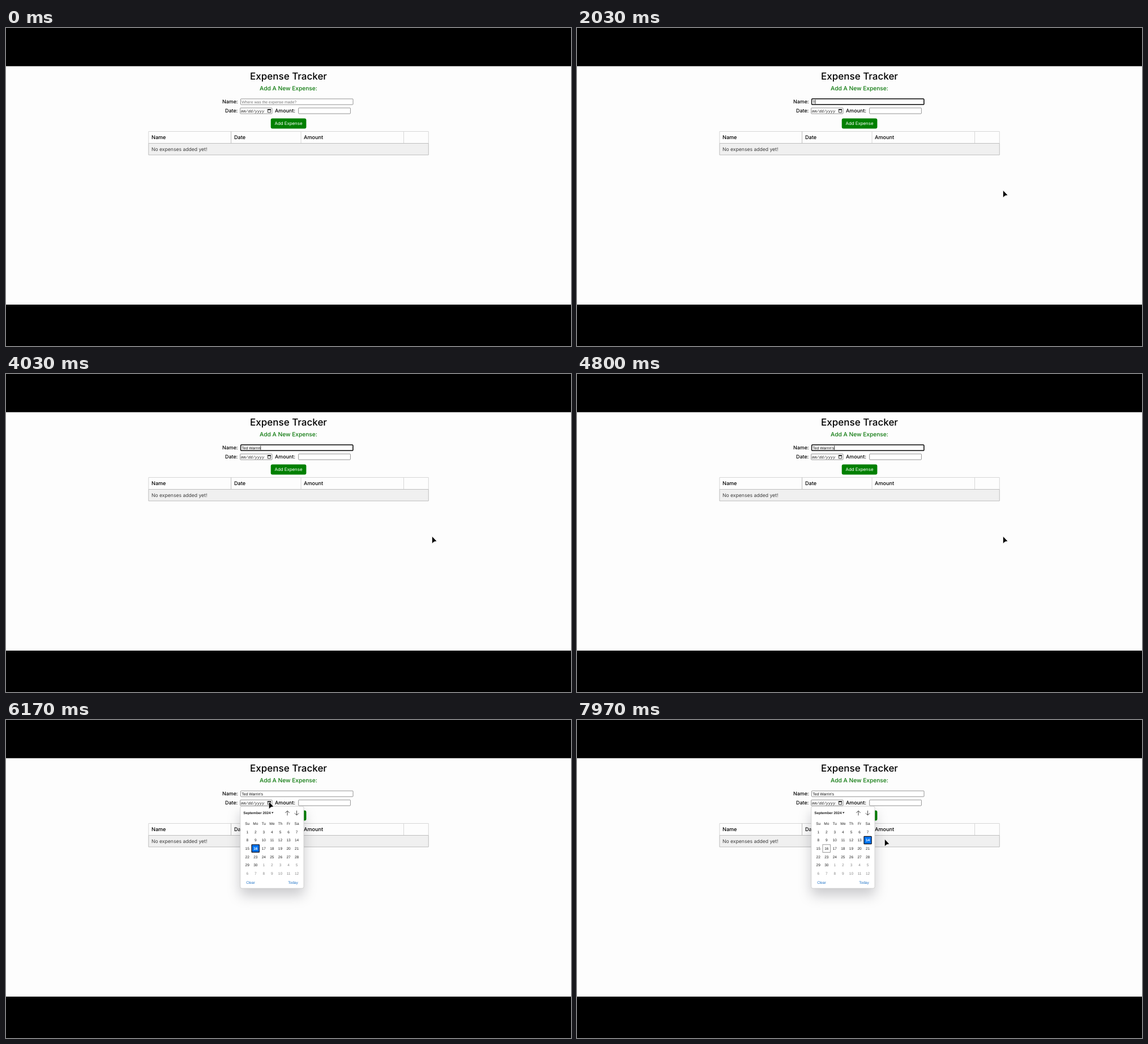
Recreate the animation shown at these times as an HTML page. Size 998 px wide and 561 px high, loop 8 s.

```html
<!DOCTYPE html>
<html lang="en">
<head>
<meta charset="utf-8">
<title>Expense Tracker</title>
<style>
  html, body { margin: 0; width: 100%; height: 100%; overflow: hidden; background: #000; }
  svg { display: block; width: 100vw; height: 100vh; }
  text { font-family: Inter, "Open Sans", sans-serif; text-rendering: geometricPrecision; white-space: pre; }
  .label { font-size: 8.9px; font-weight: 500; }
  .head { font-size: 9.1px; font-weight: 500; }
  .mid { text-anchor: middle; }
  .field { fill: #fff; stroke: #707070; stroke-width: .75; }
  .arial { font-family: "Liberation Sans", Arial, sans-serif; font-size: 6.9px; }
  .cal text { font-family: "Liberation Sans", Arial, sans-serif; font-size: 6.5px; fill: #222; }
  .cal .other { fill: #858585; }
  .cal .on { fill: #fff; font-weight: bold; }
  .cal .link { fill: #1a6fc4; }
  .popup { filter: drop-shadow(0 12px 11px rgba(0, 0, 16, .2)); }
  .icon { fill: none; stroke: #333; stroke-width: .9; }
</style>
</head>
<body>
<svg viewBox="0 0 998 561">
  <rect width="998" height="561"/>
  <rect y="67.4" width="998" height="420.6" fill="#fdfdfd"/>

  <text class="mid" x="499" y="91" font-size="17" font-weight="450">Expense Tracker</text>
  <text class="mid" x="499" y="109.8" font-size="10.2" font-weight="500" fill="#0c780c">Add A New Expense:</text>

  <text class="label" x="382" y="132.8">Name:</text>
  <text class="label" x="387" y="149">Date:</text>
  <text class="label" x="475" y="149">Amount:</text>
  <rect class="field" x="414.5" y="125" width="198.5" height="10.2" rx="1"/>
  <rect class="field" x="413.7" y="141" width="56.3" height="10.2" rx="1"/>
  <rect class="field" x="516.7" y="141" width="91.7" height="10.2" rx="1"/>
  <rect id="focus" x="414.6" y="125.1" width="198.2" height="10" rx="1.2" fill="#fff" stroke="#101010" stroke-width="1.5"/>
  <text id="hint" class="arial" x="416.2" y="132.5" fill="#757575">Where was the expense made?</text>
  <text id="typed" class="arial" x="416.2" y="132.5" fill="#111"></text>
  <rect id="caret" y="126.6" width=".8" height="7.2"/>
  <text x="415" y="149" font-size="6.9" font-style="italic" fill="#222" style="font-family:'Liberation Mono',monospace">mm/dd/yyyy</text>
  <path d="M462.4 143.6h5v5.4h-5z" fill="none" stroke="#111" stroke-width=".8"/>
  <path d="M462 143h5.8v1.7H462z"/>

  <rect x="467.7" y="159.4" width="62.7" height="18" rx="3" fill="green"/>
  <text class="mid" x="499" y="171.1" font-size="7.85" fill="#fff">Add Expense</text>

  <path d="M251.8 203.5h494.5v20.4H251.8z" fill="#f0f0f0"/>
  <path d="M251.8 203.5V182.5h494.5v21M521 182.5v21M702.5 182.5v21" fill="none" stroke="#d6d6d6"/>
  <path d="M397.5 182.5v21M251.8 203.5h494.5v20.4H251.8z" fill="none" stroke="#bebebe"/>
  <text class="head" x="257" y="196">Name</text>
  <text class="head" x="403" y="196">Date</text>
  <text class="head" x="526" y="196">Amount</text>
  <text x="257" y="216.8" font-size="8.6" fill="#3c3c3c">No expenses added yet!</text>

  <g id="cal" class="cal">
    <rect class="popup" x="413.8" y="152.2" width="112.2" height="144.8" rx="3" fill="#fff" stroke="#c4c4c4" stroke-width=".7"/>
    <text x="419.2" y="166" style="font-size:6.3px;font-weight:bold">September 2024</text>
    <path d="M468.8 162.6h3.8l-1.9 2.4z" fill="#222"/>
    <path class="icon" d="M497 168.4v-8.2m-3.7 3.7l3.7-3.7 3.7 3.7M513.5 159.8v8.2m-3.7-3.7l3.7 3.7 3.7-3.7"/>
    <rect id="today" width="13.6" height="13.6" fill="none" stroke="#808080" stroke-width=".8"/>
    <rect id="pick" width="13.2" height="13.2" rx=".6" fill="#0075f5" stroke="#101018" stroke-width="1.2"/>
    <g id="days"></g>
    <text class="mid link" x="432" y="289">Clear</text>
    <text class="mid link" x="507" y="289">Today</text>
  </g>

  <g id="pointer">
    <path id="arrow" d="M0 0V13L3.5 9.9 8.4 8.7Z" stroke="#fff" stroke-width=".7" stroke-linejoin="round"/>
    <path id="beam" d="M-1.8-4h3.6M0-4v8M-1.8 4h3.6" fill="none" stroke="#111" stroke-width=".9"/>
  </g>
</svg>
<script>
const LOOP = 8000, FOCUS = 1150, OPEN = 5960, TODAY = 15;
const CELL = 14.56, COL = 426.2, ROW = 197.6;
const NAME = "Ted Warrin's";
const KEYS = [1950, 2250, 2480, 2750, 3020, 3250, 3440, 3600, 3700, 3950, 4150, 4400];
const PATH = [
  [100, 878, 317], [760, 474, 130], [1200, 474, 130], [1600, 752.5, 286.2],
  [5080, 752.5, 286.2], [5400, 505, 167.7], [5520, 505, 167.7], [5860, 464.3, 144],
  [6450, 464.3, 144], [6900, 484, 226], [7300, 512, 211], [7560, 512, 211], [7820, 543.4, 210]
];

const $ = id => document.getElementById(id);
const el = Object.fromEntries(
  ["focus", "hint", "typed", "caret", "cal", "today", "pick", "days", "pointer", "arrow", "beam"].map(id => [id, $(id)]));
const show = (node, on) => node.setAttribute("visibility", on ? "inherit" : "hidden");
const cellX = i => COL + (i % 7) * CELL;
const cellY = i => ROW + Math.floor(i / 7) * CELL;

function addText(x, y, label, cls) {
  const node = document.createElementNS("http://www.w3.org/2000/svg", "text");
  node.setAttribute("x", x);
  node.setAttribute("y", y);
  node.setAttribute("class", cls);
  node.textContent = label;
  el.days.append(node);
  return node;
}

["Su", "Mo", "Tu", "We", "Th", "Fr", "Sa"].forEach((d, i) => addText(cellX(i), 185, d, "mid"));
const days = Array.from({ length: 42 }, (_, i) =>
  addText(cellX(i), cellY(i) + 2.3, i % 30 + 1, i < 30 ? "mid" : "mid other"));

function placeBox(node, i) {
  const half = node.getAttribute("width") / 2;
  node.setAttribute("x", cellX(i) - half);
  node.setAttribute("y", cellY(i) - half - .1);
}
placeBox(el.today, TODAY);

function pointerAt(t) {
  const next = PATH.findIndex(p => p[0] > t);
  if (next < 1) return (next ? PATH.at(-1) : PATH[0]).slice(1);
  const [t0, x0, y0] = PATH[next - 1], [t1, x1, y1] = PATH[next];
  const u = (t - t0) / (t1 - t0), e = u * u * (3 - 2 * u);
  return [x0 + (x1 - x0) * e, y0 + (y1 - y0) * e];
}

// The last day the pointer passed over keeps the highlight.
function pickedDay(t) {
  for (let u = t; u > OPEN; u -= 10) {
    const [x, y] = pointerAt(u);
    const col = Math.round((x - COL) / CELL), row = Math.round((y - ROW) / CELL);
    if (col >= 0 && col < 7 && row >= 0 && row < 6) return row * 7 + col;
  }
  return TODAY;
}

function draw(t) {
  const count = KEYS.filter(k => k <= t).length;
  const focused = t >= FOCUS && t < OPEN;
  const blinkFrom = count ? KEYS[count - 1] : FOCUS;
  el.typed.textContent = NAME.slice(0, count);
  show(el.hint, !count);
  show(el.focus, focused);
  show(el.caret, focused && (t - blinkFrom) % 1000 < 500);
  el.caret.setAttribute("x", 416.4 + (count ? el.typed.getComputedTextLength() : 0));

  const open = t >= OPEN;
  show(el.cal, open);
  if (open) {
    const picked = pickedDay(t);
    placeBox(el.pick, picked);
    days.forEach((d, i) => d.classList.toggle("on", i === picked));
  }

  const [x, y] = pointerAt(t);
  const overName = x > 414 && x < 613 && y > 124 && y < 136;
  show(el.pointer, t >= PATH[0][0]);
  show(el.arrow, !overName);
  show(el.beam, overName);
  el.pointer.setAttribute("transform", `translate(${x} ${y})`);
}

let start;
function tick(now) {
  start ??= now;
  draw((now - start) % LOOP);
  requestAnimationFrame(tick);
}
draw(0);
requestAnimationFrame(tick);
</script>
</body>
</html>
```
